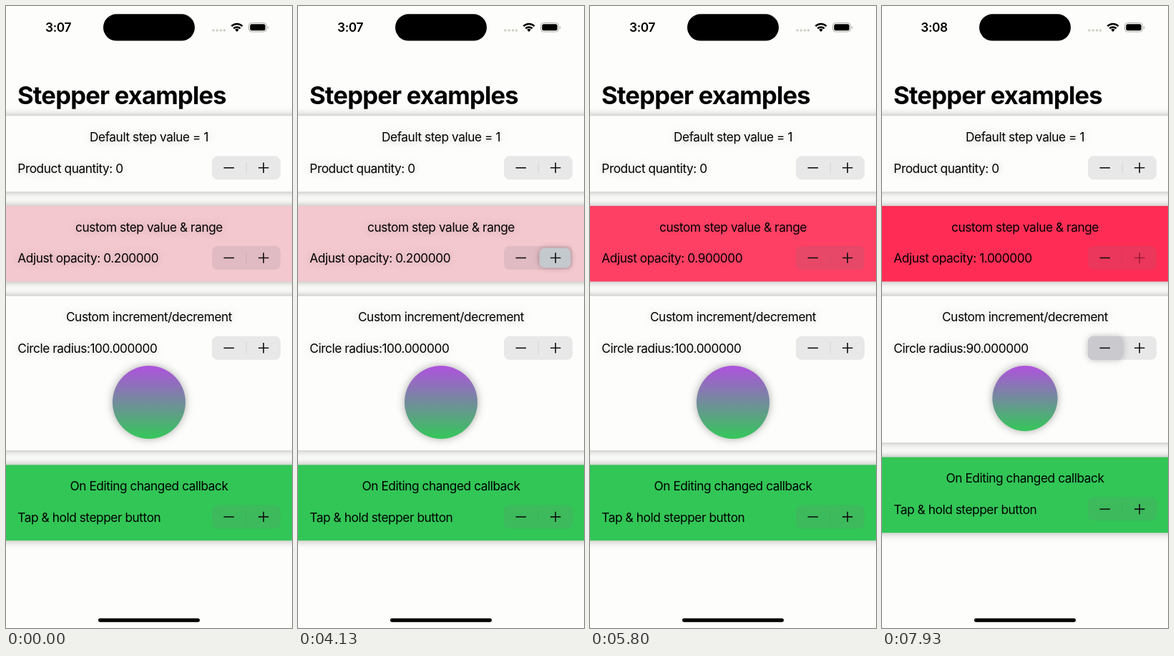
Write an HTML page that moves like this. It is 400x868 px and loops after 8 s.

```html
<!DOCTYPE html>
<html lang="en">
<head>
<meta charset="utf-8">
<title>Stepper examples</title>
<style>
html, body { margin: 0; width: 100%; height: 100%; overflow: hidden; background: #fdfdfb; }
svg { display: block; width: 100%; height: 100%; font-family: Inter, sans-serif; font-size: 17.3px; }
.label { letter-spacing: -0.44px; }
.mid { text-anchor: middle; }
</style>
</head>
<body>
<svg id="stage" viewBox="0 0 400 868"></svg>
<script>
const LOOP = 8000;
const TAPS = [4130, 4400, 4660, 5000, 5200, 5350, 5500, 5870];
const LAG = 70;
const CARD_STOPS = [[0.2, 244, 200, 207], [0.6, 240, 108, 134], [0.9, 253, 64, 100], [1, 255, 45, 85]];
const PRESS_STOPS = [[0.2, 196, 202, 206], [0.6, 200, 182, 185], [1, 204, 150, 160]];

const clamp = (v) => Math.max(0, Math.min(1, v));
const smooth = (v) => { v = clamp(v); return v * v * (3 - 2 * v); };
const $ = (id) => document.getElementById(id);
const set = (id, attrs) => { for (const k in attrs) $(id).setAttribute(k, attrs[k]); };

function mix(stops, v) {
  let i = 0;
  while (i < stops.length - 2 && v > stops[i + 1][0]) i++;
  const a = stops[i], b = stops[i + 1];
  const f = clamp((v - a[0]) / (b[0] - a[0]));
  return `rgb(${[1, 2, 3].map((n) => Math.round(a[n] + (b[n] - a[n]) * f))})`;
}

const shadow = (id, blur, alpha) => `
  <filter id="${id}" filterUnits="userSpaceOnUse" x="-60" y="-60" width="520" height="988"
    color-interpolation-filters="sRGB">
    <feDropShadow id="${id}Drop" dx="0" dy="0" stdDeviation="${blur}" flood-color="#000" flood-opacity="${alpha}"/>
  </filter>`;

function stepper(key, y) {
  return `<rect x="288" y="${y}" width="96" height="33" rx="8" fill="rgb(118,118,128)" fill-opacity="0.15"/>
    <path d="M336 ${y + 8}v17" stroke="#50505a" stroke-opacity="0.12"/>
    <rect id="${key}Press" rx="7.5" filter="url(#pressGlow)" visibility="hidden"/>
    <path d="M304.5 ${y + 16.5}h14.5" stroke="#111" stroke-width="1.6"/>
    <path id="${key}Plus" d="M353 ${y + 16.5}h14.4m-7.2-7.2v14.4" stroke="#111" stroke-width="1.6"/>`;
}

function card(key, y, h, fill, glow, heading, row) {
  return `<g id="${key}">
    <rect id="${key}Bg" x="-20" y="${y}" width="440" height="${h}" fill="${fill}" filter="url(#cardGlow)"/>
    <g class="label" filter="url(#${glow})">
      <text class="mid" x="200" y="${y + 35.5}">${heading}</text>
      <text id="${key}Text" x="16.3" y="${y + 79.3}">${row}</text>
    </g>
    ${stepper(key, y + 56)}
  </g>`;
}

const dots = [290, 295.3, 300.6, 305.4]
  .map((x) => `<circle cx="${x}" cy="34" r="1.8"/>`).join('');

$('stage').innerHTML = `
  <defs>
    ${shadow('cardGlow', 6, 0.33)}
    ${shadow('textGlow', 6, 0.2)}
    ${shadow('fadeGlow', 6, 0.2)}
    ${shadow('softGlow', 6, 0)}
    ${shadow('ballGlow', 6, 0.33)}
    ${shadow('pressGlow', 5, 0.25)}
    <linearGradient id="ballFill" x1="0" y1="0" x2="0" y2="1">
      <stop offset="0" stop-color="#af52de"/>
      <stop offset="1" stop-color="#34c759"/>
    </linearGradient>
  </defs>
  <rect width="400" height="868" fill="#fdfdfb"/>
  ${card('count', 153.3, 105.7, '#fdfdfb', 'textGlow', 'Default step value = 1', 'Product quantity: 0')}
  ${card('opacity', 279, 105.5, '', 'fadeGlow', 'custom step value &amp; range', '')}
  ${card('radius', 404.8, 215.2, '#fdfdfb', 'textGlow', 'Custom increment/decrement', '')}
  <circle id="ball" cx="200" fill="url(#ballFill)" filter="url(#ballGlow)"/>
  ${card('edit', 640.4, 105.5, '#32c656', 'softGlow', 'On Editing changed callback', 'Tap &amp; hold stepper button')}
  <text x="16" y="137.3" font-size="34.6" font-weight="700" letter-spacing="-0.8">Stepper examples</text>
  <text id="clock" class="mid" x="73" y="36" font-weight="600" letter-spacing="-0.4"></text>
  <rect x="136" y="11.3" width="128" height="37.3" rx="18.6"/>
  <g fill="#cfcfc6">${dots}</g>
  <g fill="none" stroke="#000" stroke-width="2.5">
    <path d="M315.4 28.2a10.6 10.6 0 0 1 15.2 0"/>
    <path d="M318.3 31.4a6.6 6.6 0 0 1 9.4 0"/>
  </g>
  <path d="M323 36l-2.7-2.8a3.8 3.8 0 0 1 5.4 0z"/>
  <rect x="339.5" y="23.5" width="25" height="12.5" rx="4" fill="none" stroke="#adada6"/>
  <rect x="341.3" y="25.3" width="21.4" height="9" rx="2.5"/>
  <path d="M366 28v4a2.2 2.2 0 0 0 0-4z" fill="#adada6"/>
  <rect x="129" y="854.5" width="142" height="5.2" rx="2.6"/>`;

function pressLevel(t) {
  return TAPS.reduce((best, start) => {
    const age = t - start;
    if (age < 0 || age > 300) return best;
    return Math.max(best, age < 200 ? Math.min(1, 0.6 + age / 175) : 1 - (age - 200) / 100);
  }, 0);
}

function showPress(id, x, y, level, fill) {
  const inset = 7 * (1 - level);
  set(id, {
    x: x + inset, y: y + inset, width: 49 - 2 * inset, height: 33 - 2 * inset, fill,
    opacity: Math.min(1, level * 1.6), visibility: level > 0.01 ? 'visible' : 'hidden'
  });
}

function render(t) {
  const value = 0.2 + TAPS.filter((s) => t >= s + LAG).length / 10;
  set('opacityBg', { fill: mix(CARD_STOPS, value) });
  set('fadeGlowDrop', { 'flood-opacity': 0.25 * (1 - value) });
  set('opacityPlus', { stroke: value > 0.95 ? '#9a1c38' : '#111' });
  $('opacityText').textContent = 'Adjust opacity: ' + value.toFixed(6);
  showPress('opacityPress', 335, 335, pressLevel(t), mix(PRESS_STOPS, value));

  const shrink = t < 7600 ? 0 : smooth((t - 7535) / 395);
  const r = 51 - 5.4 * shrink;
  set('ball', { cy: 502 + r, r });
  set('radiusBg', { height: 215.2 - 10.8 * shrink });
  set('edit', { transform: `translate(0 ${-10.8 * shrink})` });
  $('radiusText').textContent = 'Circle radius:' + (t < 7670 ? 100 : 90).toFixed(6);
  showPress('radiusPress', 288, 461, t < 7600 ? 0 : 1, '#cacace');

  $('clock').textContent = t < 6200 ? '3:07' : '3:08';
}

const begin = performance.now();
function tick() {
  render((performance.now() - begin) % LOOP);
  requestAnimationFrame(tick);
}
render(0);
requestAnimationFrame(tick);
</script>
</body>
</html>
```
